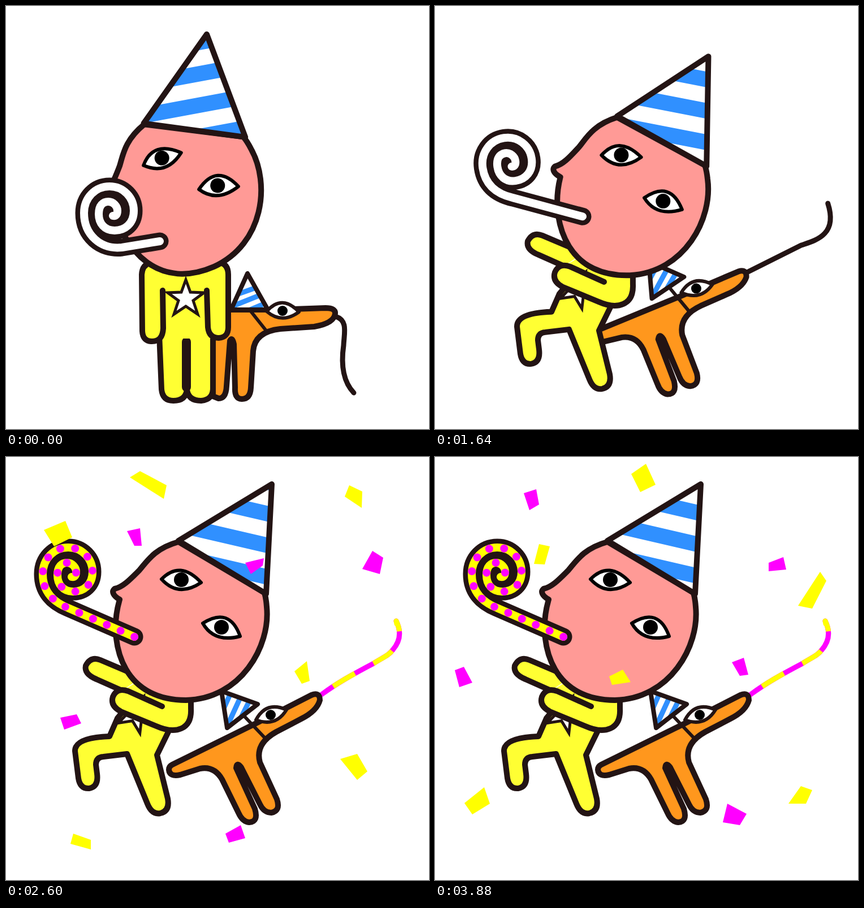
Animation of 748 by 748 pixels, one loop 3.92 s. Source, as an HTML page:

```html
<!DOCTYPE html>
<html lang="en">
<head>
<meta charset="utf-8">
<title>Party</title>
<style>
  html, body { margin: 0; height: 100%; overflow: hidden; background: #fff; }
  svg { display: block; width: 100%; height: 100%; }
  path, polygon { stroke-linejoin: round; stroke-linecap: round; }
  .ink { fill: none; stroke: #231414; stroke-width: 10; }
  .thin { stroke-width: 6; }
  .leash { stroke-width: 9; }
  .yellow { fill: #ffff33; }
  .orange { fill: #ff971d; }
  .pink { fill: #ff9a96; }
  .white { fill: #fff; }
  .eye { fill: #fff; stroke: #000; stroke-width: 6; }
  .stripe { fill: none; stroke: #3090ff; stroke-linecap: butt; }
  .roll { fill: none; stroke: #fff; stroke-width: 14; }
  .case { stroke-width: 31; }
  .lit { fill: none; display: none; }
  .glow .lit { display: inline; }
  .glow .dark { display: none; }
  .glow .roll.base { stroke: #ff0; }
</style>
</head>
<body>
<svg id="stage" viewBox="0 0 748 748">
  <defs>
    <clipPath id="hatClip"><path d="M470 48L305 148L460 242Z"/></clipPath>
    <clipPath id="dogHatUp"><path d="M427 473L398 537H463Z"/></clipPath>
    <clipPath id="dogHatTilted"><path d="M445 437L381 414L391 479Z"/></clipPath>
    <polygon id="star" class="ink white" style="stroke-width:5;stroke-linejoin:miter"
      points="0,-32 8,-10 32,-9 13,5 21,29 0,15 -21,29 -13,5 -32,-9 -8,-10"/>
  </defs>

  <g id="standing">
    <path class="ink orange" d="M395 537H480L565 534Q583 534 582 544Q580 561 545 567L485 571Q440 576 437 610L433 675Q432 695 417 695Q404 695 405 675L403 598Q400 584 396 592L390 672Q389 694 376 694L366 690V560Z"/>
    <path class="ink leash" d="M583 549C605 556 598 578 597 600C592 635 597 665 615 684"/>
    <path class="ink thin" d="M433 540L460 574"/>
    <path class="white" d="M427 473L398 537H463Z"/>
    <path class="stripe" clip-path="url(#dogHatUp)" stroke-width="9" d="M400 513L445 497M400 531L460 507M425 540L470 521"/>
    <path class="ink" style="stroke-width:8" d="M427 473L398 537H463Z"/>
    <path class="ink white thin" d="M461 540Q488 509 518 541Q488 563 461 540"/>
    <circle cx="489" cy="539" r="9"/>
    <path class="ink yellow" d="M271 580L275 678Q277 698 296 698Q318 698 320 678Q322 698 345 698Q367 696 366 674V575"/>
    <path class="ink" style="stroke-width:16" d="M319 594V674"/>
    <g id="torso">
      <path class="yellow" d="M250 456H385L378 588H276V510Z"/>
      <use href="#star" transform="translate(318 516)"/>
      <path class="ink yellow" d="M277 503L278 570Q277 593 258 593Q242 593 241 575L240 475Q241 454 262 453"/>
      <path class="ink yellow" d="M355 503L357 568Q359 587 376 587Q393 586 393 568V475Q393 455 375 453"/>
    </g>
  </g>

  <g id="dancing">
    <g id="dog">
      <path class="ink leash dark" d="M558 420L648 367C672 357 712 345 690 290"/>
      <path class="lit leash" stroke="#f0f" d="M558 420C585 400 612 385 650 365C665 355 676 352 684 341Q704 318 690 290"/>
      <path class="lit leash" stroke="#ff0" stroke-dasharray="0 25 45 37 40 38 40 99" style="stroke-linecap:butt" d="M558 420C585 400 612 385 650 365C665 355 676 352 684 341Q704 318 690 290"/>
      <path class="lit leash" stroke="#ff0" d="M691 295L690 290"/>
      <path class="ink orange" d="M294 544L440 472L540 421Q555 415 555 430Q550 449 522 463L478 486Q440 507 449 540L479 605Q486 626 469 629Q456 629 449 614L416 549Q408 538 407 550L440 622Q447 645 430 646Q418 645 411 629L382 570Q368 546 343 551L308 562Q289 566 288 553Q288 547 294 544Z"/>
      <path class="ink thin" d="M421 458L458 497"/>
      <path class="white" d="M445 437L381 414L391 479Z"/>
      <path class="stripe" clip-path="url(#dogHatTilted)" stroke-width="9" d="M384 447L398 416M391 476L415 424M409 474L432 428"/>
      <path class="ink" style="stroke-width:8" d="M445 437L381 414L391 479Z"/>
      <path class="ink white thin" d="M442 465Q460 431 496 447Q477 478 442 465"/>
      <circle cx="468" cy="456" r="9"/>
    </g>
    <g id="body">
      <path class="ink yellow" d="M240 390L167 359Q150 352 141 369Q138 384 160 393L205 413"/>
      <path class="ink yellow" d="M215 440L197 462L183 494Q122 496 122 520L128 568Q131 587 147 586Q164 583 161 560L159 544Q159 531 172 530L214 525L250 613Q258 633 273 630Q290 626 286 604L267 527L290 480"/>
      <path class="yellow" d="M238 394L326 432L290 480L215 440L203 415Z"/>
      <use href="#star" transform="translate(230 453) rotate(25)"/>
      <path class="ink yellow" d="M276 441L216 414Q196 407 189 424Q184 440 203 450L266 476C300 491 329 482 327 445V430"/>
    </g>
  </g>

  <g id="head">
    <path class="ink pink" d="M305 150C262 162 249 185 236 200C220 216 207 230 192 233C186 238 190 246 201 252C187 300 195 345 212 375C232 410 268 430 318 430C415 428 468 335 461 265Q460 250 457 240Z"/>
    <path class="eye" d="M275 216Q308 182 345 222Q305 249 275 216"/>
    <circle cx="310" cy="217" r="13"/>
    <path class="eye" d="M348 294Q395 264 414 317Q368 329 348 294"/>
    <circle cx="381" cy="301" r="13"/>
    <path class="white" d="M470 48L305 148L460 242Z"/>
    <g clip-path="url(#hatClip)"><path id="stripes" class="stripe" stroke-width="200" stroke-dasharray="28 28" d="M-80 0V400"/></g>
    <path class="ink" d="M470 48L305 148L460 242Z"/>
  </g>

  <g id="blower">
    <path class="ink case"/>
    <path class="roll base"/>
    <path class="roll lit" style="stroke:#f0f" stroke-dasharray="0 26.6"/>
  </g>

  <g id="confettiA">
    <path fill="#ff0" d="M347 30L373 12L390 49L363 62ZM184 154L203 158L194 190L175 189ZM681 203L692 219L667 268L642 263ZM308 388L332 376L346 398L313 403ZM52 612L87 584L97 613L66 632ZM647 582L667 589L656 613L625 613Z"/>
    <path fill="#f0f" d="M157 64L179 57L184 84L167 94ZM590 187L616 177L621 199L590 202ZM525 363L546 355L554 385L539 387ZM35 377L51 371L66 399L43 407ZM517 613L551 631L539 651L509 646Z"/>
  </g>
  <g id="confettiB">
    <path fill="#ff0" d="M219 36L237 25L284 50L279 74ZM607 50L630 61L629 90L599 70ZM67 129L105 113L117 142L85 158ZM510 379L532 361L537 396L523 401ZM591 534L621 525L639 556L621 571ZM119 666L150 677L150 694L114 684Z"/>
    <path fill="#f0f" d="M214 131L237 126L240 157L227 157ZM648 166L667 178L661 207L630 198ZM423 187L456 179L454 192L433 207ZM96 461L125 455L133 471L103 482ZM388 666L415 651L423 674L394 682Z"/>
  </g>
</svg>
<script>
const LOOP = 3920, JUMP = 1480, SETTLE = 2300, GLOW = 2240, CONFETTI = 1760, SWAP = 480;
const PERIOD = 56, STRIPE_SPEED = 0.0455;
const $ = id => document.getElementById(id);
const show = (id, on) => $(id).style.display = on ? 'inline' : 'none';
const place = (id, transform) => $(id).setAttribute('transform', transform);

const coil = 'c0-27 20-47 45-47s43 20 43 43-16 35-34 35-28-13-28-29 8-22 17-22 16 8 16 16-4 10-8 9';
const rolledUp = 'M272 416L205 427C168 431 138 405 138 366' + coil;
const blown = 'M227 318L110 267C80 255 65 235 65 207' + coil;

function draw(t) {
  const dance = t >= JUMP;
  show('standing', !dance);
  show('dancing', dance);
  for (const path of $('blower').children) path.setAttribute('d', dance ? blown : rolledUp);

  if (dance) {
    const left = Math.max(0, (SETTLE - t) / 660);
    const drop = left ** 1.8, sway = left ** 1.3;
    place('dog', `translate(${-9 * drop * drop} ${41 * left * left}) rotate(${3.9 * left} 430 500)`);
    place('body', `translate(${23 * sway} ${47 * drop})`);
    place('head', `translate(${22 * sway} ${46 * drop}) rotate(${-2 * drop} 330 290)`);
    place('blower', `translate(${34 * left} ${54 * drop}) rotate(${-8.5 * left} 230 318)`);
  } else {
    const crouch = 0.0055 * t;
    place('torso', `translate(0 ${crouch})`);
    place('head', `translate(355 ${50 + crouch}) rotate(-23.5) translate(-470 -48)`);
    place('blower', `translate(0 ${crouch})`);
  }

  const edge = (((dance ? 18.3 : 26) - STRIPE_SPEED * t) % PERIOD + PERIOD) % PERIOD;
  place('stripes', `translate(470 48) skewY(13) translate(0 ${edge - 84})`);

  $('stage').classList.toggle('glow', t >= GLOW);
  const turn = Math.floor((t - CONFETTI) / SWAP);
  show('confettiA', turn >= 0 && turn % 2 === 0);
  show('confettiB', turn >= 0 && turn % 2 === 1);
}

const start = performance.now();
function tick() {
  draw((performance.now() - start) % LOOP);
  requestAnimationFrame(tick);
}
tick();
</script>
</body>
</html>
```
